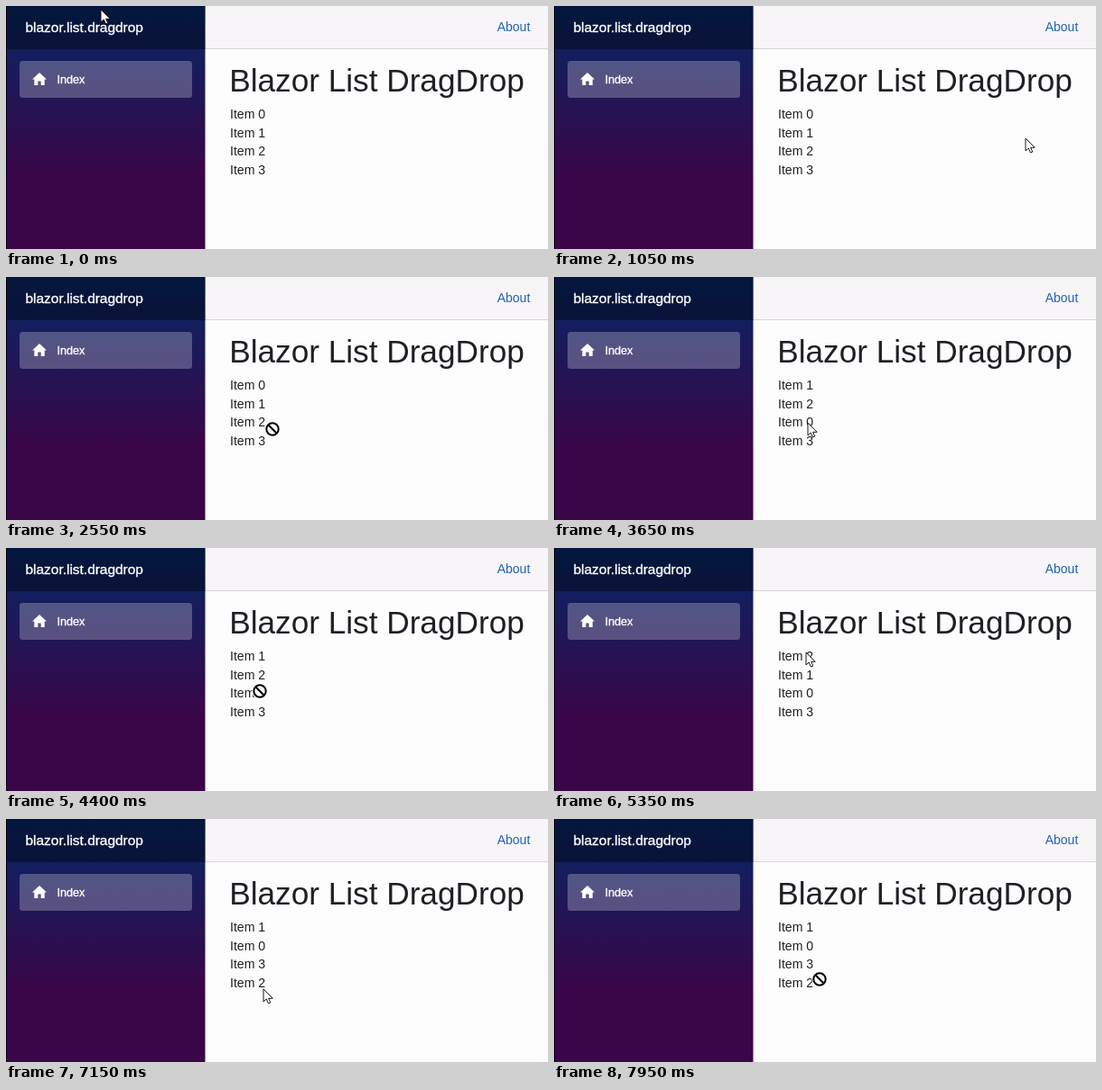
Animation, 600 px wide and 270 px high, one loop 8000 ms. Source, as an HTML page:

```html
<!DOCTYPE html>
<html lang="en">
<head>
<meta charset="utf-8">
<title>Blazor List DragDrop</title>
<style>
  html, body { margin: 0; width: 100%; height: 100%; overflow: hidden; background: #fefdfe; }
  svg { display: block; width: 600px; height: 270px; }
  text { font-family: "Liberation Sans", Arial, sans-serif; font-size: 14.1px; fill: #1d2025; }
  .light { fill: #fff; }
  text.light { stroke: #fff; stroke-width: .35px; }
</style>
</head>
<body>
<svg viewBox="0 0 600 270">
  <defs>
    <linearGradient id="side" x1="0" y1="0" x2="0" y2="1">
      <stop offset="0" stop-color="#052767"/>
      <stop offset=".7" stop-color="#3a0647"/>
    </linearGradient>
  </defs>

  <rect width="600" height="270" fill="#fefdfe"/>
  <rect x="220" width="380" height="48" fill="#f7f5f8"/>
  <rect x="220" y="47" width="380" height="1" fill="#d6d5d5"/>
  <rect width="220.5" height="270" fill="url(#side)"/>
  <rect width="220.5" height="48" fill="#000" fill-opacity=".4"/>
  <rect width="1" height="270" fill="#08030f"/>

  <text class="light" x="21.5" y="28.5" style="font-size:15.45px">blazor.list.dragdrop</text>
  <rect x="15" y="61" width="191" height="41" rx="3.5" fill="#fff" fill-opacity=".25"/>
  <path class="light" d="M37 74L29 81.5H31.3V88H35.3V83.5H38.7V88H42.7V81.5H45Z"/>
  <text class="light" x="56.6" y="86.2" style="font-size:12.6px">Index</text>

  <text x="543.7" y="28.3" style="font-size:14px;fill:#1f62b3">About</text>
  <text x="247.2" y="95" style="font-size:35.2px">Blazor List DragDrop</text>
  <g id="list"></g>

  <path id="arrow" d="M0 0V14L3.2 11L5.5 16L7.8 15L5.6 10.3H10.2Z" fill="#fff" stroke="#16161c" stroke-linejoin="round"/>
  <g id="blocked" fill="none">
    <circle r="6.7" stroke="#fff" stroke-width="4"/>
    <circle r="6.7" fill="#fff" stroke="#000" stroke-width="2"/>
    <path d="M-4.7 -4.7L4.7 4.7" stroke="#000" stroke-width="2"/>
  </g>
</svg>
<script>
const LOOP = 8000, STEP = 50, GLIDE = 600;

// the pointer glides to each stop and is there at the given time
const stops = [
  { at: 0, x: 105, y: 4 },
  { at: 850, x: 522, y: 147 },
  { at: 1750, x: 283, y: 118 },
  { at: 2500, x: 295, y: 169 },
  { at: 3400, x: 281, y: 162 },
  { at: 4900, x: 279, y: 116 },
  { at: 5950, x: 285, y: 189 },
  { at: 7950, x: 294, y: 178 }
];
// each drag takes the item of one row to another row
const drags = [
  { start: 1950, end: 2850, from: 0, to: 2 },
  { start: 4350, end: 4800, from: 1, to: 0 },
  { start: 5400, end: 5950, from: 0, to: 3 },
  { start: 7700, end: 8200, from: 3, to: 2 }
];

const byId = id => document.getElementById(id);
const arrow = byId("arrow"), blocked = byId("blocked");
const smooth = u => u * u * (3 - 2 * u);

const rows = [0, 1, 2, 3].map(i => {
  const row = document.createElementNS("http://www.w3.org/2000/svg", "text");
  row.setAttribute("x", 248);
  row.setAttribute("y", 125.4 + i * 20.5);
  return byId("list").appendChild(row);
});

function pointerAt(t) {
  let { x, y } = stops[0];
  for (const stop of stops) {
    const u = Math.min(1, Math.max(0, (t - stop.at + GLIDE) / GLIDE));
    if (stop === stops[0]) continue;
    x += (stop.x - x) * smooth(u);
    y += (stop.y - y) * smooth(u);
  }
  return [Math.round(x), Math.round(y)];
}

function orderAt(t) {
  const order = [0, 1, 2, 3];
  for (const { end, from, to } of drags)
    if (t >= end) order.splice(to, 0, ...order.splice(from, 1));
  return order;
}

function draw(t) {
  const dragging = drags.some(d => t >= d.start && t < d.end);
  const order = orderAt(t), [x, y] = pointerAt(t);
  arrow.style.display = dragging ? "none" : "";
  blocked.style.display = dragging ? "" : "none";
  (dragging ? blocked : arrow).setAttribute("transform", `translate(${x} ${y})`);
  rows.forEach((row, i) => { row.textContent = "Item " + order[i]; });
}

const start = performance.now();
function tick() {
  const t = (performance.now() - start) % LOOP;
  draw(Math.floor(t / STEP) * STEP);
  requestAnimationFrame(tick);
}
tick();
</script>
</body>
</html>
```
